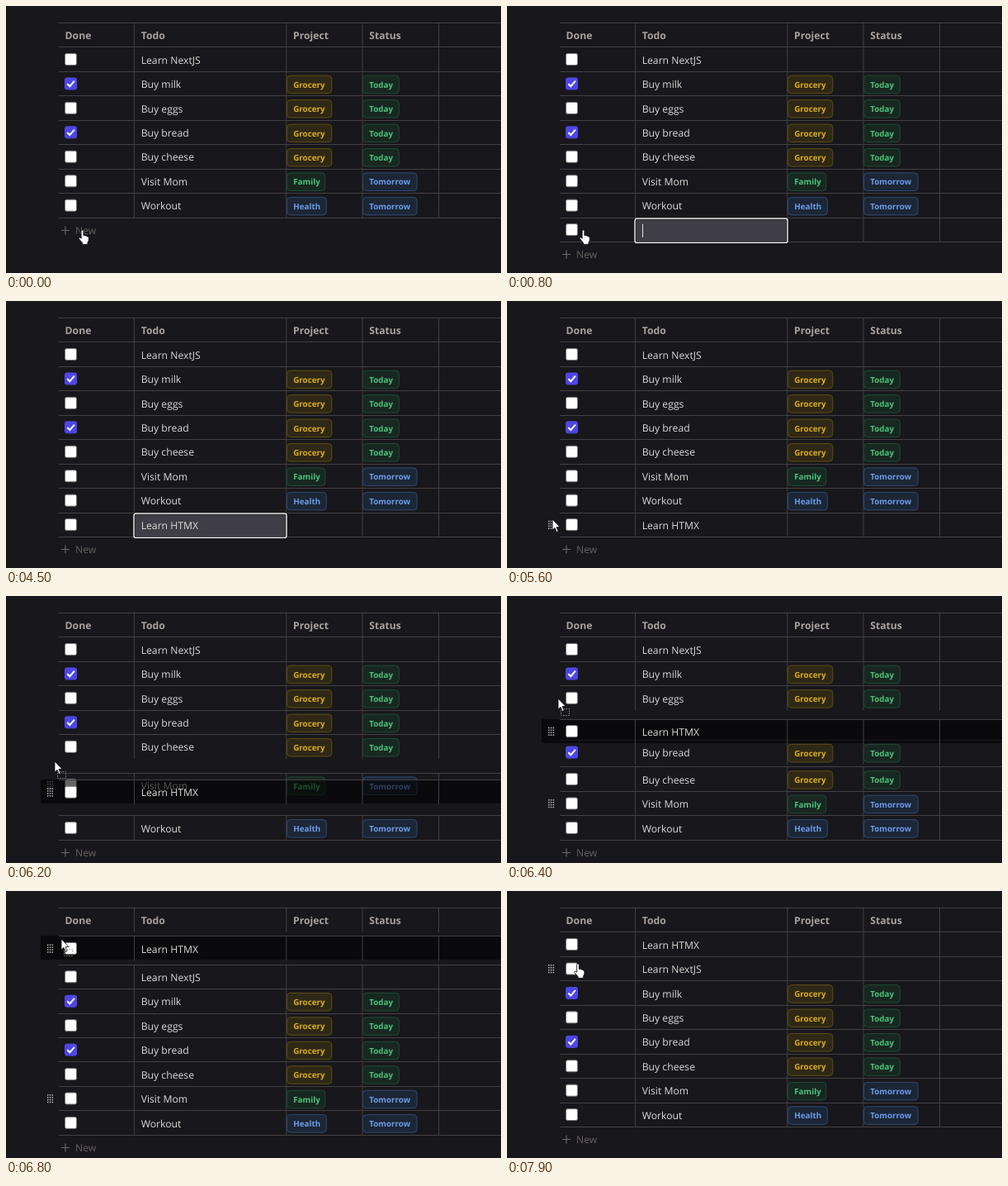
An HTML page that plays this animation: 600 by 323 pixels, repeating every 8000 ms.

```html
<!DOCTYPE html>
<html lang="en">
<head>
<meta charset="utf-8">
<title>Todo table</title>
<style>
  html, body { margin: 0; width: 100%; height: 100%; overflow: hidden; background: #18171b; }
  svg { display: block; width: 600px; height: 323px; }
  text { font: 500 12.2px "Open Sans", "Noto Sans", sans-serif; fill: #dcdad8; text-rendering: geometricPrecision; }
  .head text { font-weight: 700; fill: #a8a29e; }
  .foot text { fill: #65615f; }
  .badge text { font-size: 9.85px; font-weight: 700; }
  .line { fill: #434043; }
</style>
</head>
<body>
<svg id="stage" viewBox="0 0 600 323"></svg>
<script>
const LOOP = 8000, STEP = 100;
const PITCH = 29.44, TOP = 49.44, EXTRA = 9.8;
const DIVIDERS = [155, 339.3, 431.5, 524];

const YELLOW = ['#2f2816', '#5d4d16', '#dcae1c'];
const GREEN = ['#182721', '#1d4d35', '#4ac47c'];
const BLUE = ['#1c2635', '#2f4b76', '#6b9cea'];
const BADGES = {
  Grocery: [54.5, YELLOW], Family: [46.5, GREEN], Health: [48, BLUE],
  Today: [44, GREEN], Tomorrow: [65.8, BLUE]
};
const TODOS = [
  ['Learn NextJS', false],
  ['Buy milk', true, 'Grocery', 'Today'],
  ['Buy eggs', false, 'Grocery', 'Today'],
  ['Buy bread', true, 'Grocery', 'Today'],
  ['Buy cheese', false, 'Grocery', 'Today'],
  ['Visit Mom', false, 'Family', 'Tomorrow'],
  ['Workout', false, 'Health', 'Tomorrow']
];

// [time, typed text]
const TYPING = [[0, ''], [1600, 'L'], [2000, 'Le'], [2200, 'Lea'], [2400, 'Lear'], [2500, 'Learn'],
  [2700, 'Learn\u00a0'], [3100, 'Learn H'], [3300, 'Learn HT'], [3600, 'Learn HTM'], [3900, 'Learn HTMX']];
// [time, slot of the dragged row]
const SLOTS = [[6000, 7], [6200, 5.7], [6300, 4.6], [6400, 3.2], [6700, 0.5], [6800, 0]];
// [time, x, y] of the pointer tip
const POINTER = [[0, 92.5, 271], [900, 92.5, 271], [5100, 97, 302], [5300, 75, 274], [5400, 64, 260],
  [5500, 64, 260], [5600, 55, 264], [5900, 55, 264], [6000, 57, 255], [6200, 59, 200], [6400, 62, 124],
  [6600, 65, 80], [6800, 67, 58], [7000, 60, 41], [7300, 60, 41], [7500, 66, 58], [7800, 83, 87], [7900, 86, 88]];

const stage = document.getElementById('stage');

function add(parent, tag, attrs = {}, content) {
  const el = document.createElementNS('http://www.w3.org/2000/svg', tag);
  for (const key in attrs) el.setAttribute(key, attrs[key]);
  if (content !== undefined) el.textContent = content;
  return parent.appendChild(el);
}
const rect = (parent, x, y, width, height, attrs) => add(parent, 'rect', { x, y, width, height, ...attrs });
const label = (parent, x, y, str) => add(parent, 'text', { x, y }, str);
const show = (el, on) => { el.style.display = on ? '' : 'none'; };
const move = (el, x, y) => el.setAttribute('transform', `translate(${x} ${y})`);
const clamp = v => Math.max(0, Math.min(1, v));

function frameLines(g) {
  rect(g, 64, 0, 536, 1, { class: 'line' });
  for (const x of DIVIDERS) rect(g, x, 0, 1, 30, { class: 'line' });
}

function badge(g, x, name) {
  const [width, [fill, stroke, ink]] = BADGES[name];
  const b = add(g, 'g', { class: 'badge' });
  rect(b, x + 0.6, 4.5, width - 0.3, 21.5, { rx: 4, fill, stroke });
  label(b, x + 8.2, 19, name).style.fill = ink;
}

function checkbox(g, on) {
  rect(g, 71.5, 7.3, 14, 14, { rx: 2, fill: on ? '#4f46e5' : '#fff', stroke: on ? '#4f46e5' : '#767676' });
  if (on) add(g, 'path', { d: 'M74.3 14.4l3 3.1 5.6-6.5', fill: 'none', stroke: '#fff', 'stroke-width': 2 });
}

function grip(g) {
  const dots = add(g, 'g', { fill: '#bdbbb9' });
  for (let i = 0; i < 12; i++) rect(dots, 50 + (i % 3) * 2.8, 9.4 + Math.floor(i / 3) * 2.9, 1.5, 1.5);
  return dots;
}

function makeField(g) {
  const field = add(g, 'g');
  rect(field, 155, 0.9, 185, 29.2, { rx: 2.5, fill: '#18171b', stroke: '#fff', 'stroke-width': 1.3 });
  rect(field, 156.4, 2.3, 182.2, 26.4, { rx: 1, fill: '#3f3e46' });
  return field;
}

function makeRow([name, done, project, status]) {
  const frame = add(stage, 'g');
  const shade = rect(frame, 42, 0, 558, 29, { fill: '#000', opacity: 0.6 });
  frameLines(frame);
  const body = add(stage, 'g');
  const field = makeField(body);
  checkbox(body, done);
  const text = label(body, 163.7, 19.4, name);
  const caret = rect(body, 164, 7.5, 1, 16, { fill: '#e4e4e4' });
  if (project) badge(body, 340, project);
  if (status) badge(body, 432, status);
  const dots = grip(body);
  for (const el of [shade, field, caret, dots]) show(el, false);
  return { frame, body, shade, field, text, caret, dots };
}

// Lines snap to whole pixels, the content does not
function place(row, y) {
  move(row.frame, 0, Math.round(y));
  move(row.body, 0, y + 0.8);
}

const head = add(stage, 'g', { class: 'head' });
move(head, 0, 20);
frameLines(head);
[['Done', 71.6], ['Todo', 163.7], ['Project', 348], ['Status', 440.2]].forEach(([s, x]) => label(head, x, 20, s));

const foot = add(stage, 'g', { class: 'foot' });
rect(foot, 64, 0, 536, 1, { class: 'line' });
add(foot, 'path', { d: 'M67 15.5h10M72 10.5v10', stroke: '#6b6765', 'stroke-width': 1.2 });
label(foot, 84, 20, 'New');

const rows = TODOS.map(makeRow);
const added = makeRow(['', false]);

const ink = { fill: '#fff', stroke: '#000', 'stroke-width': 0.8, 'stroke-linejoin': 'round' };
const pointer = add(stage, 'g');
const arrow = add(pointer, 'path', { d: 'M0 0V13.2L3 10.4 5.2 15.6 7.2 14.7 5 9.6H9.2Z', ...ink });
const hand = add(pointer, 'path', {
  d: 'M3.5 11V2a1.4 1.4 0 0 1 2.8 0V7.2l1-.3a1.2 1.2 0 0 1 1.4 .8l.9-.1a1.2 1.2 0 0 1 1.3 1h.6' +
     'a1.2 1.2 0 0 1 1.2 1.2V13L11.3 16V18H5V16.3L.9 11.3C.2 10 1.6 8.9 2.6 9.9Z',
  transform: 'translate(-4.9 -.6)', ...ink
});
const ghost = rect(pointer, 3.5, 12.5, 10, 8, { fill: 'none', stroke: '#8d8b89', 'stroke-dasharray': '1.5 1.5' });

// Linear value between the entries of a [time, ...values] table
function at(table, t) {
  let i = 0;
  while (i < table.length - 1 && table[i + 1][0] <= t) i++;
  const a = table[i], b = table[i + 1] || a;
  const k = b === a ? 0 : clamp((t - a[0]) / (b[0] - a[0]));
  return a.slice(1).map((v, n) => v + (b[n + 1] - v) * k);
}

function render(t) {
  const exists = t >= 700;
  const dragging = t >= 6000 && t < 7300;
  const focused = exists && t < 4600;
  const gap = dragging ? EXTRA : t === 7300 ? EXTRA / 2 : 0;
  const [slot] = at(SLOTS, t);

  rows.forEach((row, i) => {
    const pushed = 1 - Math.pow(1 - clamp(i + 1 - slot), 1.6);
    place(row, TOP + PITCH * i + pushed * (PITCH + gap));
  });
  show(rows[5].dots, t >= 6200 && dragging);
  show(rows[0].dots, t >= 7700);

  show(added.frame, exists);
  show(added.body, exists);
  place(added, TOP + PITCH * slot + gap / 2);
  show(added.shade, dragging);
  show(added.dots, t >= 5400 && t < 7700);
  show(added.field, focused);
  const typed = TYPING.filter(e => e[0] <= t).pop()[1];
  if (added.text.textContent !== typed) added.text.textContent = typed;
  show(added.caret, focused && t < 4500 && !(t >= 1200 && t < 1600));
  added.caret.setAttribute('x', Math.round(163.5 + (typed ? added.text.getComputedTextLength() : 0)));

  move(foot, 0, Math.round(TOP + PITCH * (exists ? 8 : 7) + gap));

  const pointing = t < 5200 || t >= 7900;
  show(pointer, t < 900 || t >= 5100);
  move(pointer, ...at(POINTER, t));
  show(hand, pointing);
  show(arrow, !pointing);
  show(ghost, dragging);
}

const start = performance.now();
function tick() {
  const t = (performance.now() - start) % LOOP;
  render(Math.floor(t / STEP) * STEP);
  requestAnimationFrame(tick);
}
tick();
</script>
</body>
</html>
```
